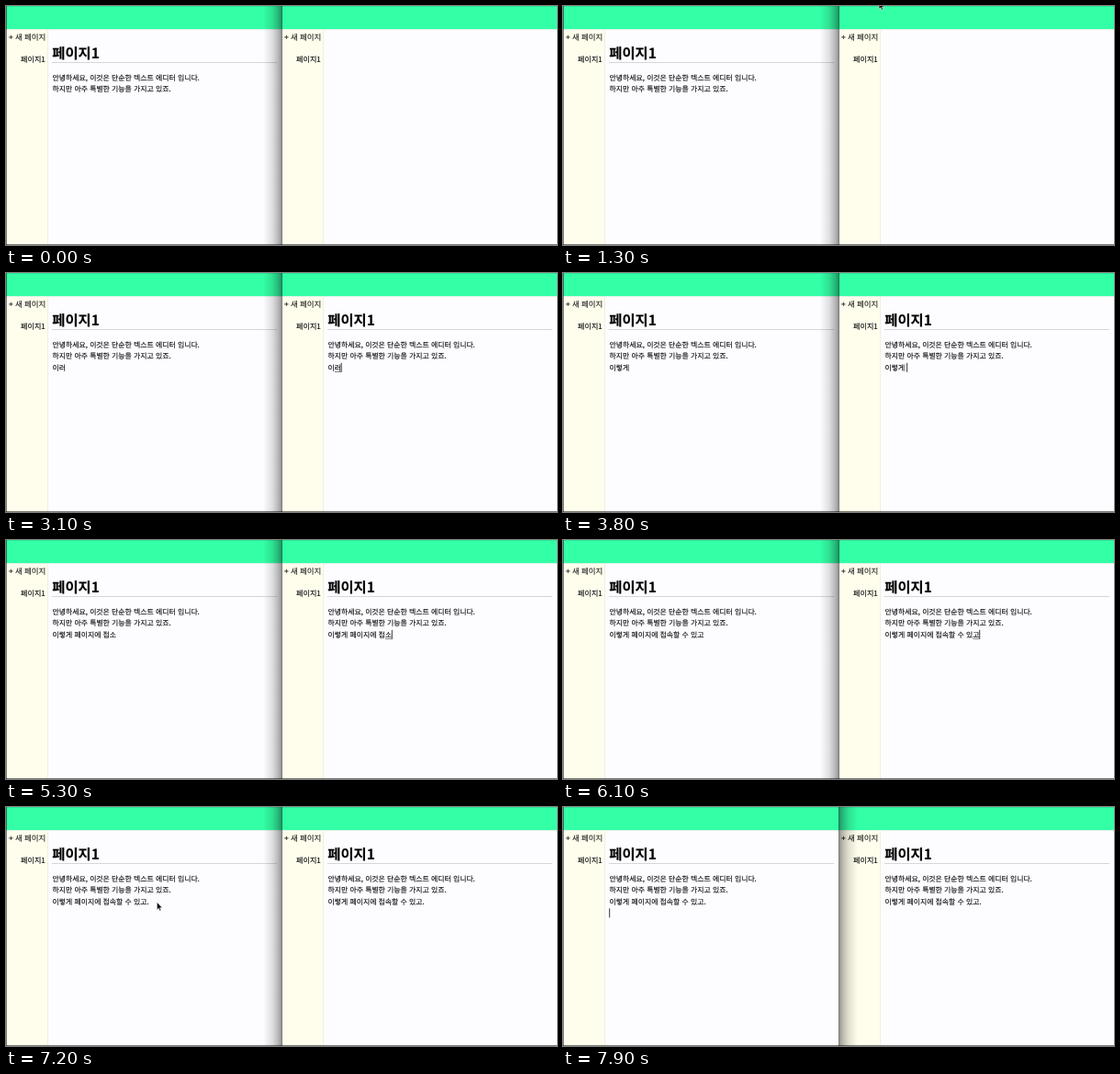
Write an HTML page that moves like this. It is 600 px wide and 260 px high and loops after 8000 ms.

```html
<!DOCTYPE html>
<html lang="ko">
<head>
<meta charset="utf-8">
<style>
  html, body { margin: 0; width: 100%; height: 100%; overflow: hidden; background: #fdfcff; }
  svg { display: block; width: 600px; height: 260px; }
  text {
    font: 7.88px "Noto Sans CJK KR", "Noto Sans CJK JP", "Noto Sans CJK", sans-serif;
    fill: #0c0c0c; stroke: #0c0c0c; stroke-width: .12;
    white-space: pre; text-rendering: geometricPrecision;
  }
  .title { font-size: 15.4px; font-weight: 700; fill: #000; }
  .new { font-size: 8.45px; fill: #2a2a2a; }
  .side { font-size: 8.05px; text-anchor: end; }
</style>
</head>
<body>
<svg viewBox="0 0 600 260">
  <defs>
    <linearGradient id="fade">
      <stop offset="0" stop-color="#000" stop-opacity="0"/>
      <stop offset=".5" stop-color="#000" stop-opacity=".12"/>
      <stop offset=".85" stop-color="#000" stop-opacity=".29"/>
      <stop offset="1" stop-color="#000" stop-opacity=".42"/>
    </linearGradient>
  </defs>
  <g id="panes"></g>
  <rect id="shadow" x="280" width="20" height="260" fill="url(#fade)"/>
  <path d="M.5 0V260M300.5 0V260M0 259.5H600" stroke="#000" stroke-opacity=".5"/>
  <path id="under" stroke="#555" stroke-width=".7"/>
  <path id="caret" stroke="#222" stroke-width=".9"/>
  <path id="arrow" d="M0 0V8.4L1.9 6.7L3.2 9.6L4.6 9L3.3 6.2H5.9Z" fill="#000" stroke="#fff" stroke-width=".6"/>
  <path id="beam" d="M-1.6 -4.5Q0 -4.5 0 -3.6Q0 -4.5 1.6 -4.5M0 -3.6V3.6M-1.6 4.5Q0 4.5 0 3.6Q0 4.5 1.6 4.5M-1 1.8H1" fill="none" stroke="#222" stroke-width=".8"/>
</svg>
<script>
const LOOP = 8000, STEP = 100, OPEN = 1700, SWAP = 7300;
const $ = id => document.getElementById(id);

const pane = (x, id) => `<g transform="translate(${x})">
  <rect width="300" height="260" fill="#fdfcff"/>
  <rect y="25" width="45" height="235" fill="#fffeed"/>
  <path d="M45.5 26V260" stroke="#f1efe0"/>
  <rect width="300" height="25" fill="#33ffa6"/>
  <path d="M0 .25H300" stroke="#27b87b" stroke-width=".5"/>
  <path d="M0 25.5H300" stroke="#d9f3e4"/>
  <text class="new" x="2.9" y="36.5">+ 새 페이지</text>
  <text class="side" x="42.8" y="61">페이지1</text>
  <g id="${id}">
    <text class="title" x="50.3" y="57.3">페이지1</text>
    <path d="M50 61.5H295" stroke="#d6d5d9"/>
    <text x="50.5" y="80.6">안녕하세요, 이것은 단순한 텍스트 에디터 입니다.</text>
    <text x="50.5" y="93.1">하지만 아주 특별한 기능을 가지고 있죠.</text>
    <text class="typed" x="50.5" y="105.6"></text>
  </g>
</g>`;
$('panes').innerHTML = pane(0, 'left') + pane(300, 'right');
const typed = [...document.querySelectorAll('.typed')];

// Typed line: [time, text]
const typing = [
  [0, ''], [2700, 'ㅇ'], [2800, '이'], [2900, '일'], [3100, '이러'], [3300, '이렇'],
  [3500, '이렇ㄱ'], [3600, '이렇게'], [3800, '이렇게 '], [4000, '이렇게 페'],
  [4100, '이렇게 페이'], [4200, '이렇게 페이지'], [4900, '이렇게 페이징'],
  [5000, '이렇게 페이지에'], [5100, '이렇게 페이지에 ㅈ'], [5200, '이렇게 페이지에 접'],
  [5300, '이렇게 페이지에 접소'], [5400, '이렇게 페이지에 접속'],
  [5500, '이렇게 페이지에 접속하'], [5600, '이렇게 페이지에 접속할'],
  [5700, '이렇게 페이지에 접속할 수'], [5800, '이렇게 페이지에 접속할 수 이'],
  [6000, '이렇게 페이지에 접속할 수 있'], [6100, '이렇게 페이지에 접속할 수 있고'],
  [6200, '이렇게 페이지에 접속할 수 있고.']
];

// Pointer: [time, x, y, shape]
const path = [
  [0, 0, 0, ''], [1300, 344, -5, 'arrow'], [1400, 208, 40, 'arrow'], [1500, 320, 63, 'arrow'],
  [1700, 320, 63, 'arrow'], [1800, 358, 70, 'beam'], [2100, 483.3, 91.6, 'beam'],
  [2400, 535.5, 103, 'beam'], [2700, 0, 0, ''], [6500, 465, 103, 'beam'],
  [6700, 360, 100, 'arrow'], [7000, 164, 104.5, 'arrow'], [7300, 164.5, 103, 'arrow'],
  [7400, 168, 91, 'beam'], [7700, 203.5, 107, 'beam'], [7900, 0, 0, '']
];

// Caret visible spans: [from, to]
const caretOn = [[2400, 4500], [4700, 6700], [7400, 7700], [7900, 8000]];

const at = (keys, t) => keys.findLastIndex(k => k[0] <= t);
const show = (el, on) => el.setAttribute('visibility', on ? 'visible' : 'hidden');

function movePointer(t) {
  const i = at(path, t), a = path[i], b = path[i + 1];
  const k = b && b[3] ? (t - a[0]) / (b[0] - a[0]) : 0;
  for (const id of ['arrow', 'beam']) {
    show($(id), a[3] === id);
    if (a[3] === id) {
      const [x, y] = [1, 2].map(n => a[n] + (b[n] - a[n]) * k);
      $(id).setAttribute('transform', `translate(${x} ${y})`);
    }
  }
}

function draw(now) {
  const t = Math.floor(now % LOOP / STEP) * STEP;
  const text = typing[at(typing, t)][1];
  const swapped = t >= SWAP, newLine = t >= 7900;

  show($('right'), t >= OPEN);
  typed.forEach(el => el.textContent = text);
  $('shadow').setAttribute('transform', swapped ? 'translate(601) scale(-1 1)' : '');

  const width = text ? typed[1].getComputedTextLength() : 0;
  const x = (swapped ? 50.7 : 350.7) + (newLine ? 0 : width);
  const y = newLine ? 110.3 : 97.8;
  $('caret').setAttribute('d', `M${x} ${y}v10`);
  show($('caret'), caretOn.some(([from, to]) => t >= from && t < to));

  // The syllable being composed is underlined
  $('under').setAttribute('d', `M${x - 7.4} 107.5h7.2`);
  show($('under'), text && !/[ .]$/.test(text));

  movePointer(t);
}

function tick() {
  draw(performance.now());
  requestAnimationFrame(tick);
}
tick();
</script>
</body>
</html>
```
